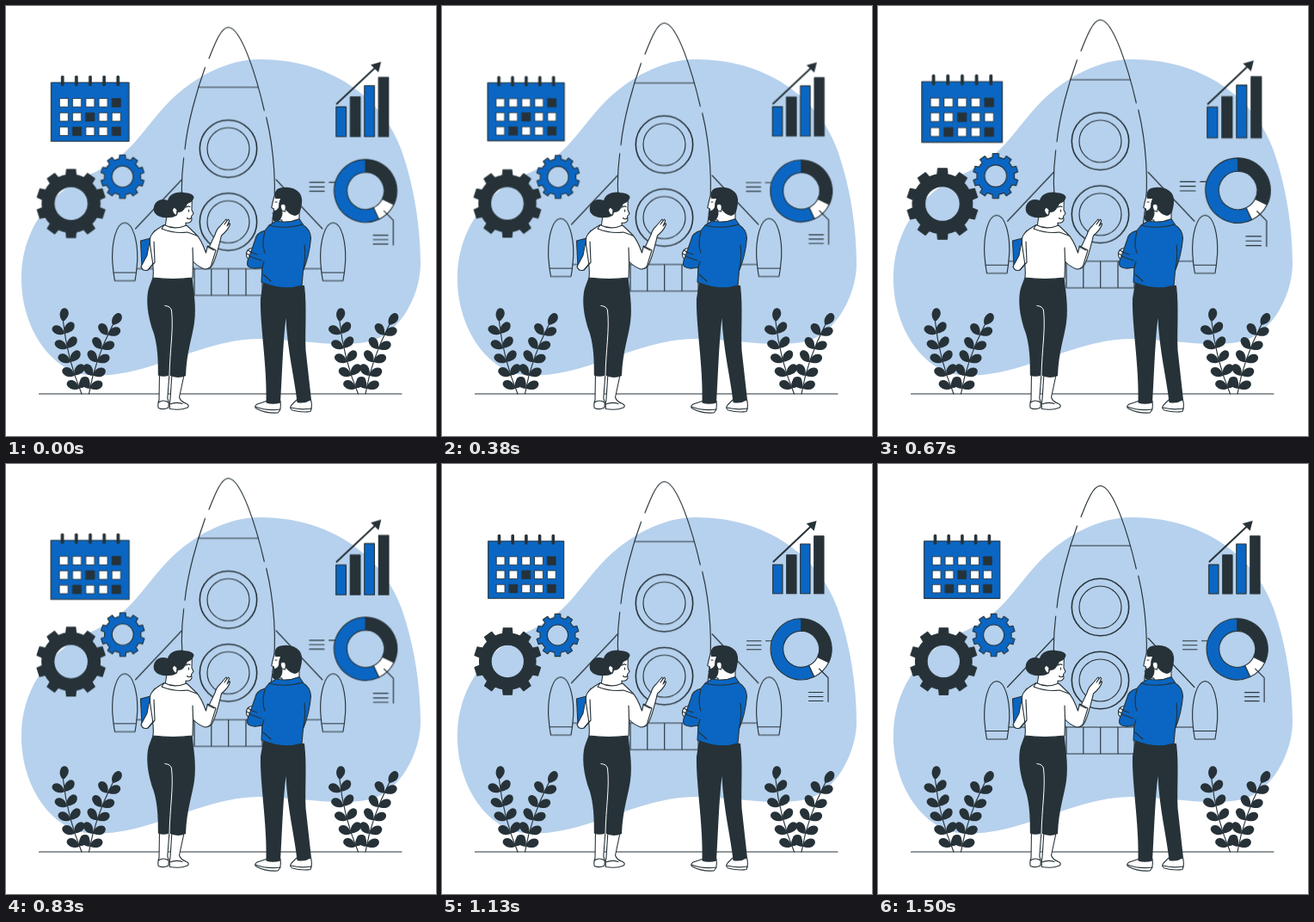
Recreate the animation shown at these times as an HTML page. Size 500 by 500 pixels, loop 1.54 s.

```html
<!DOCTYPE html>
<html lang="en">
<head>
<meta charset="utf-8">
<title>Rocket planning</title>
<style>
  html, body { margin: 0; width: 100%; height: 100%; overflow: hidden; background: #fff; }
  svg { display: block; width: 100vw; height: 100vh; }
  .ink { fill: none; stroke: #263238; stroke-width: 1.15; stroke-linecap: round; stroke-linejoin: round; }
  .dark { fill: #263238; }
  .blue { fill: #0a66c2; }
  .white { fill: #fff; }
  .edge { stroke: #263238; stroke-width: 1.1; stroke-linejoin: round; stroke-linecap: round; }
</style>
</head>
<body>
<svg viewBox="0 0 500 500">
  <path fill="#b6d1ed" d="M18 312C19 270 42 222 95 197C148 174 156 146 190 111C217 84 256 62 295 62C376 62 438 106 460 168C475 211 482 258 482 300C482 335 458 385 418 391C380 397 345 388 295 387C255 387 220 402 180 415C145 427 120 431 95 429C50 424 16 370 18 312Z"/>

  <g id="rocket" class="ink">
    <path d="M236 61.500C243 44 250 25.500 258.500 25.300C274 26 291.500 84 300.300 122"/>
    <path d="M231.500 72C222 98 211 137 208 167M206.700 177C204 198 203.500 226 207 250Q211 284 218 305.500M302.700 130C312 168 315 216 310 250Q306 284 299 305.500M223.500 95H293.500"/>
    <g id="windows"></g>
    <path d="M152 306H366.400M219 306V337H306M238.800 306V337M258.700 306V337M279 306V337M298 306V337"/>
    <g id="fin">
      <path d="M204.300 202.500L150.500 259.500"/>
      <path d="M138 252.500C128 253 123 275 123.700 297L125 310.500H151.500L152.700 297C153.500 275 148 253 138 252.500ZM125 310.500L126.500 320H150L151.500 310.500"/>
    </g>
    <use href="#fin" transform="matrix(-1 0 0 1 518.400 0)"/>
  </g>

  <g id="calendar">
    <rect class="blue edge" x="53.700" y="89.700" width="88" height="66.500"/>
  </g>

  <g id="gears"></g>

  <g id="chart">
    <path class="ink" style="stroke-width:2" d="M385.500 113.500L430 71.500"/>
    <path class="dark" d="M435.600 66L423.800 69.300L432.600 77.800Z"/>
  </g>

  <g id="donut">
    <path class="ink" d="M376.500 205.700H391M354.500 205.700H371M354.500 210.700H371M354.500 215.700H371M426.500 265.500H443M426.500 270.500H443M426.500 275.500H443"/>
  </g>

  <path class="ink" d="M38.500 451H460"/>
  <g id="plant"></g>
  <use href="#plant" x="321.500"/>

  <g id="woman">
    <path class="white edge" d="M178.500 427L178 458Q176 464 177.300 467.500Q183 470 188.800 467Q190 462 187.800 456L190 427Z"/>
    <path class="white edge" d="M193 427L191 457Q189.500 464 190.500 468.500Q203 470.500 211 467Q214 464.500 210 462.500Q203 460 201.500 455L207.500 427Z"/>
    <path class="ink" d="M177.300 461Q183 457 189 461M190.300 463Q198 460 205 462.500"/>
    <path class="dark" d="M171 314.500H216.500C218 332 221.500 348 219 368C217 384 210 402 209 430Q199 434 190 429.500Q183 432 176.800 429.500C177 410 176 395 172 381C164 360 162.500 340 166 328Z"/>
    <path fill="none" stroke="#fff" d="M184.500 348.500Q191.500 349 192.500 354C195 376 190.500 400 190 430"/>
    <path class="blue edge" d="M156.500 273L168 270L171 301L158 304Z"/>
    <path class="white edge" d="M173 261C167 268 166 280 164 290L157 303Q159 309 165 307L174 296Z"/>
    <path class="white edge" d="M187 244L185 257Q196 263 209 259L209 252Q214 253 216 249L215.500 244.500L218 241.500L216 237L216.300 225L196 226Z"/>
    <path class="white edge" d="M221 267Q228 277 232.500 288L243 266Q244.500 260 249 256L255.800 248L257 249.500L254 254L258.500 248L259.700 249.500L257 256L260 252.500L260.500 254Q258 261 250.500 267C247 281 244 295 239.500 302Q235 308 229 304L216 294Z"/>
    <path class="white edge" d="M184 254.500C176 259 168 264 167.500 271C166.500 282 173 300 171 316Q194 319 217 316L217.500 297Q223 303 231 306Q236 306 238.500 302L244 284L234.500 279L232.500 287C229 277 226 270 220.500 265L210 255Q196 261 184 254.500Z"/>
    <path class="ink" d="M184 254.500L181 259Q196 265 211 263L222 267M217.500 297L217 281M172 274L173 298L165 307M234 280L242 284"/>
    <path class="dark" d="M188 226C190 218 200 215.500 207 217Q217 217.500 218.500 222Q218.500 227 211 230Q207 240 200 240Q199 246 189 246Q177 247 172.500 240C169 231 177 222 188 226Z"/>
    <path class="white edge" d="M199 237Q195 232 193.500 237Q194 243 198.500 243Z"/>
    <path class="ink" d="M209.500 234Q212 232 214 233.500M212.500 237V239M210.500 246.500Q213 249 215.500 246.500"/>
  </g>

  <g id="man">
    <path class="white edge" d="M304 459L292 463Q288 465.500 291 468Q302 474 316 473Q320.500 470 319 459Z"/>
    <path class="white edge" d="M338 458L332 464Q329 468 333 470Q344 473 354 471.500Q356.500 465 354.500 458Z"/>
    <path class="ink" d="M290 466Q303 471 319 469M331 467Q343 470 355.500 468"/>
    <path class="dark" d="M299 322L347 325C350 350 347.500 375 348.500 400L355 458Q347 463 338.500 461C336 435 327 400 325.500 363C322 390 321 430 319 461.500Q310 464 302.500 461.500C304 420 295 370 296 340Z"/>
    <path class="white edge" d="M312 221L309.700 230L308.800 234.500L311.500 236L313 248L321 249L321 254L341 252V229L330 218Z"/>
    <path class="dark" d="M313 224Q311 213 319 211.500Q333 208.500 341 217Q346 223 343 235Q342 243 336 244Q328 242 324 235L321 237Q323 245 317 250Q311 252 309.500 247L311.500 238Q315 238 317 234Q317 228 319 224Z"/>
    <path class="white edge" d="M321 238Q317 231 322 230Q327 230 324.500 239Z"/>
    <path class="white edge" d="M290 281Q281 281 279.500 287Q279 293 283 295L294 292Z"/>
    <path class="blue edge" d="M306 255L314 250Q328 253 341 247.500L346 255Q354 260 354.500 270C353 288 348 302 345.500 308L344 325Q322 332 297 321L298 304Q285 307 281 302Q279.500 298 283 291L290 271Q291 264 301 261Z"/>
    <path class="ink" d="M306 255Q324 260 345 254M301 262Q297 277 301 287M283 291L297 296M284 286L292 289M298 304L300 297M345.500 307Q349 292 347 278M299 312L308 320"/>
    <path class="ink" d="M281 284L285 286M280 288L284 290M313 228H315M310 241H312"/>
  </g>
</svg>

<script>
  const NS = 'http://www.w3.org/2000/svg';
  const LOOP = 1540, LEAD = LOOP / 37;
  const $ = id => document.getElementById(id);

  function add(parent, tag, attrs) {
    const el = document.createElementNS(NS, tag);
    for (const k in attrs) el.setAttribute(k, attrs[k]);
    return parent.appendChild(el);
  }

  // Angles in degrees, clockwise from the top.
  function polar(cx, cy, r, deg) {
    const a = deg * Math.PI / 180;
    return (cx + r * Math.sin(a)).toFixed(2) + ' ' + (cy - r * Math.cos(a)).toFixed(2);
  }

  for (const cy of [166.500, 251.500]) {
    add($('windows'), 'circle', { cx: 258.500, cy, r: 33.200, style: 'stroke-width:1.600' });
    add($('windows'), 'circle', { cx: 258.500, cy, r: 24.500 });
  }

  // Calendar
  const marked = ['0,4', '1,2', '2,1', '2,4'];
  for (let col = 0; col < 5; col++) {
    add($('calendar'), 'path', {
      d: `M${66.500 + col * 15.700} 83.500V92`, class: 'ink', style: 'stroke-width:3.600'
    });
    for (let row = 0; row < 3; row++) {
      add($('calendar'), 'rect', {
        x: 63.500 + col * 14.800, y: 107.800 + row * 16.200, width: 9.500, height: 9.500,
        class: 'edge ' + (marked.includes(row + ',' + col) ? 'dark' : 'white'),
        style: 'stroke-width:.8'
      });
    }
  }

  // Gears
  function gear(cx, cy, out, root, hole, cls) {
    let d = '';
    for (let a = 0; a < 360; a += 36) {
      d += (a ? `A${root} ${root} 0 0 1 ` : 'M') + polar(cx, cy, root, a - 10) +
        'L' + polar(cx, cy, out, a - 7.500) + 'L' + polar(cx, cy, out, a + 7.500) +
        'L' + polar(cx, cy, root, a + 10);
    }
    d += `A${root} ${root} 0 0 1 ${polar(cx, cy, root, -10)}Z` +
      `M${cx - hole} ${cy}a${hole} ${hole} 0 1 0 ${2 * hole} 0a${hole} ${hole} 0 1 0 ${-2 * hole} 0Z`;
    add($('gears'), 'path', { d, class: cls + ' edge', 'fill-rule': 'evenodd' });
  }
  gear(76.300, 229.500, 39, 32.800, 19.200, 'dark');
  gear(134.500, 199, 24.800, 20.500, 12, 'blue');

  // Bar chart
  [117, 105.700, 93, 83.700].forEach((y, i) => add($('chart'), 'rect', {
    x: 384.700 + i * 16, y, width: 11.300, height: 150.700 - y, class: 'edge ' + (i % 2 ? 'dark' : 'blue')
  }));

  // Donut
  function sector(from, to, cls) {
    const cx = 417.700, cy = 215.300, big = to - from > 180 ? 1 : 0;
    const p = (r, a) => polar(cx, cy, r, a);
    add($('donut'), 'path', {
      d: `M${p(35.500, from)}A35.500 35.500 0 ${big} 1 ${p(35.500, to)}L${p(21, to)}A21 21 0 ${big} 0 ${p(21, from)}Z`,
      class: cls + ' edge'
    });
  }
  sector(0, 116, 'dark');
  sector(116, 155, 'white');
  sector(155, 360, 'blue');
  add($('donut'), 'path', { d: 'M438.500 238L449 248.500V276.500', class: 'ink' });

  // Plants
  const LEAF = 'M0 0C-3.500 -2 -6.500 -7 -4.500 -12.500C-3 -17 2.500 -17 4.300 -12.500C6.300 -8 3 -3 0 0Z';
  function sprig(x0, y0, x1, y1, x2, y2, lean, spots) {
    add($('plant'), 'path', { d: `M${x0} ${y0}Q${x1} ${y1} ${x2} ${y2}`, class: 'ink' });
    const leaf = (t, deg) => {
      const u = 1 - t;
      const x = u * u * x0 + 2 * u * t * x1 + t * t * x2;
      const y = u * u * y0 + 2 * u * t * y1 + t * t * y2;
      add($('plant'), 'path', { d: LEAF, class: 'dark', transform: `translate(${x} ${y}) rotate(${deg})` });
    };
    for (const t of spots) {
      leaf(t, lean - 54);
      leaf(t, lean + 48);
    }
    leaf(1, lean + 17);
  }
  sprig(88, 451, 71, 410, 66.500, 367, -9, [.08, .26, .45, .64, .84]);
  sprig(96.500, 451, 103, 412, 124, 371, 18, [.08, .27, .47, .66, .86]);

  // Motion
  function loop(id, frames) {
    $(id).animate(frames, { duration: LOOP, iterations: Infinity, delay: -LEAD, easing: 'linear' });
  }
  loop('rocket', [0, -10, 0].map(y => ({ transform: `translateY(${y}px)` })));

  const beat = [[0, 1], [.1, 1.1], [.3, 1], [.4, 1], [.5, 1.1], [.6, 1], [1, 1]]
    .map(([offset, s]) => ({ offset, transform: `scale(${s})` }));
  const centres = { calendar: [97.700, 119], gears: [98.400, 221.500], chart: [414.700, 108.500], donut: [404, 228] };
  for (const id in centres) {
    const [x, y] = centres[id];
    $(id).style.transformOrigin = `${x}px ${y}px`;
    loop(id, beat);
  }
</script>
</body>
</html>
```
